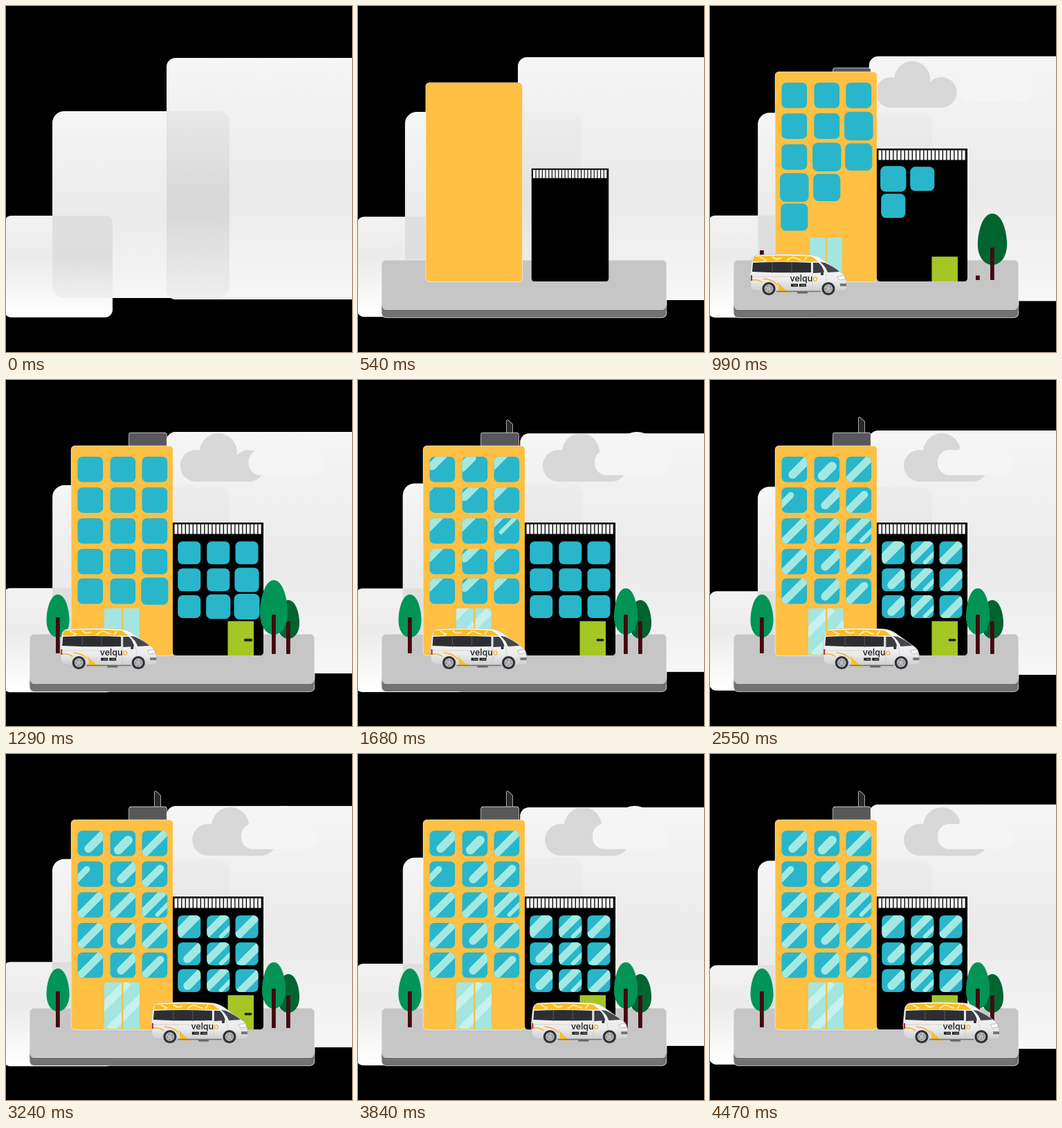
Write an HTML page that moves like this. It is 500 by 500 pixels and loops after 4500 ms.

```html
<!DOCTYPE html>
<html lang="en">
<head>
<meta charset="utf-8">
<title>City street</title>
<style>
  html, body { margin: 0; width: 100%; height: 100%; overflow: hidden; background: #000; }
  svg { display: block; width: 100%; height: 100%; }
  .cards { isolation: isolate; }
  .cards .tint { mix-blend-mode: multiply; }
  .rim { stroke: #efefef; stroke-width: 1.4; paint-order: stroke; }
  .brand { font: 500 12.5px Inter, sans-serif; }
</style>
</head>
<body>
<svg viewBox="0 0 500 500">
  <defs>
    <linearGradient id="haze" x1="0" y1="0" x2="0" y2="1">
      <stop offset="0" stop-color="#f6f6f6"/>
      <stop offset=".55" stop-color="#eaeaea"/>
      <stop offset="1" stop-color="#f7f7f7"/>
    </linearGradient>
    <linearGradient id="fade" x1="0" y1="0" x2="0" y2="1">
      <stop offset="0" stop-color="#f3f3f3"/>
      <stop offset=".4" stop-color="#ebebeb"/>
      <stop offset="1" stop-color="#fff"/>
    </linearGradient>
    <linearGradient id="paint" x1="0" y1="0" x2="0" y2="1">
      <stop offset="0" stop-color="#fafafa"/>
      <stop offset=".7" stop-color="#ececec"/>
      <stop offset="1" stop-color="#cfcfcf"/>
    </linearGradient>
    <clipPath id="glass"><path d="M142 333q0-3 3-3h22v67h-25zM169.500 330h20.500q3 0 3 3v64h-23.500z"/></clipPath>
  </defs>

  <g class="cards">
    <rect class="tint" id="card3" x="-3" y="303" width="157" height="147" rx="11" fill="url(#fade)"/>
    <rect class="tint" id="card2" x="67" y="152" width="256" height="270" rx="17" fill="url(#haze)"/>
    <rect class="tint" id="card1" x="232" y="75" width="352" height="349" rx="13" fill="url(#haze)"/>
    <rect id="wash" x="232" y="75" width="352" height="349" rx="13" fill="url(#haze)"/>
  </g>

  <g id="greyCloud" fill="#d8d8d8">
    <circle cx="303" cy="124" r="23"/>
    <circle cx="335" cy="104" r="27"/>
    <circle cx="379" cy="124" r="23"/>
    <rect x="303" y="108" width="76" height="39"/>
  </g>
  <g id="whiteCloud" fill="#f5f5f5">
    <circle cx="390" cy="105" r="30"/>
    <rect x="329" y="101" width="110" height="36.500" rx="17"/>
  </g>

  <g id="base">
    <rect class="rim" x="34.500" y="378" width="411" height="72" rx="6" fill="#727272"/>
    <rect class="rim" x="34.500" y="367.500" width="411" height="71" rx="6" fill="#c6c6c6"/>
    <path d="M34.500 430v9q0 6 6 6h399q6 0 6-6v-9q0 9-6 9h-399q-6 0-6-9z" fill="#727272"/>
  </g>

  <path class="rim" id="mast" d="M215 77V54.500l1.500-.5 6.500 6v17z" fill="#29292b"/>
  <rect class="rim" id="roof" x="178" y="76.500" width="54" height="28" rx="3" fill="#57585a"/>
  <rect class="rim" id="tower" x="94.500" y="95.500" width="146.500" height="302.500" rx="5" fill="#ffc043"/>
  <g id="block">
    <path d="M241 206h131v187q0 5-5 5H246q-5 0-5-5z"/>
    <path d="M243.500 215.500H370" stroke="#f4f4f4" stroke-width="14" stroke-dasharray="4.200 1.300"/>
  </g>
  <g id="windows"></g>

  <g id="glassDoor" clip-path="url(#glass)">
    <rect x="141" y="329" width="53" height="69" fill="#a3e6e0"/>
    <g id="doorShine" stroke="#c6f1ed" stroke-width="12">
      <path d="M134 372l42-42M150 398l52-52"/>
    </g>
  </g>
  <rect id="greenDoor" x="320.500" y="348.500" width="37.500" height="49.500" fill="#a6c626"/>
  <rect id="handle" x="344.500" y="374" width="11" height="3.500" rx="1.700" fill="#1c2410"/>

  <g id="trees"></g>

  <g id="van"><g transform="translate(278 358)">
    <path d="M69 54h15v3.500H69z" fill="#666"/>
    <path d="M3 12Q4 3 11 2Q55-.5 90 2Q99 3 106 8L131 26Q139 30 140 40L141 50Q140 54 133 54H16Q3 54 2 48L1 33z"
      fill="url(#paint)" stroke="#b9b9b9" stroke-width=".7"/>
    <path d="M7 4Q50 1 90 4L100 11.500H4z" fill="#f9bd22"/>
    <path d="M15 5l9 4-6 3M33 4q6 6 13 2M54 10q7-7 12-4t9 3M83 5l-4 5" fill="none" stroke="#fff0b8" stroke-width="1.800"/>
    <path d="M5 13Q45 11 89 13V27Q40 28 4 26z" fill="#2d2e32"/>
    <path d="M33 12v16M61 12v16" stroke="#54565a" stroke-width="1"/>
    <path d="M92 13h8q6 5 8 14l-16 1z" fill="#3a3c41"/>
    <path d="M102 12l7 1q13 6 21 13l-17 1q-3-9-11-15z" fill="#45474d"/>
    <path d="M91 12v42M110 28l2 12M4 33h86" stroke="#c8c8c8" stroke-width=".7" fill="none"/>
    <path d="M36 33q7 14 23 24l-17-3q2-11-6-21z" fill="#f9bd22"/>
    <path d="M3 38q11-1 16 4M20 36q14 1 20 9" fill="none" stroke="#f6b52a" stroke-width="1.500"/>
    <path d="M2 31h2v8H2z" fill="#b4272d"/>
    <path d="M127 33l10-2 2 6-9 1z" fill="#f8f8f8" stroke="#999" stroke-width=".6"/>
    <path d="M131 43h9v4h-9z" fill="#777"/>
    <rect x="103" y="27" width="4" height="4" rx="1" fill="#333"/>
    <path d="M39 54.500h64" stroke="#707070" stroke-width="1.500"/>
    <text class="brand" x="58.500" y="39.500" fill="#17181c">velqu<tspan fill="#f3b52b">o</tspan></text>
    <path d="M60 43.500h10v4H60zM72 43.500h10v4H72z" fill="#17181c"/>
    <path d="M63 45.500h6M75 45.500h6" stroke="#aaa" stroke-width=".8"/>
    <g id="wheels"></g>
  </g></g>
</svg>

<script>
const LOOP = 4500, STEP = 30, SWAY = 1920;
const $ = id => document.getElementById(id);
const clamp = u => Math.min(1, Math.max(0, u));
const span = (t, a, b) => clamp((t - a) / (b - a));
const easeOut = u => 1 - (1 - u) ** 2;
const easeInOut = u => u * u * (3 - 2 * u);
const wave = (t, peak) => Math.cos(2 * Math.PI * (t - peak) / SWAY);
const tracks = [];

function add(parent, name, attrs) {
  const el = document.createElementNS('http://www.w3.org/2000/svg', name);
  for (const k in attrs) el.setAttribute(k, attrs[k]);
  return parent.appendChild(el);
}

function keys(t, points) {
  if (t <= points[0][0]) return points[0][1];
  for (let i = 1; i < points.length; i++) {
    const [a, va] = points[i - 1], [b, vb] = points[i];
    if (t < b) return va + (vb - va) * (t - a) / (b - a);
  }
  return points[points.length - 1][1];
}

const pop = (t, start, peak = 1.13) =>
  keys(t - start, [[0, 0], [85, 1 + (peak - 1) / 2], [140, peak], [175, peak], [260, 1]]);

// Each track maps time to { x, y, sx, sy, o }, scaled around (ox, oy).
function track(el, ox, oy, pose) {
  tracks.push(t => {
    const { x = 0, y = 0, sx = 1, sy = sx, o = 1 } = pose(t);
    el.setAttribute('transform',
      `translate(${ox + x} ${oy + y}) scale(${sx} ${sy}) translate(${-ox} ${-oy})`);
    el.setAttribute('opacity', o);
    el.setAttribute('visibility', sx * sy * o ? 'visible' : 'hidden');
  });
}

const grow = (el, ox, oy, a, b) => track(el, ox, oy, t => ({ sx: easeOut(span(t, a, b)) }));
const rise = (el, oy, a, b) => track(el, 0, oy, t => ({ sy: easeOut(span(t, a, b)) }));

// Background cards breathe; the wash lightens their overlap
const breathe = (id, ox, oy, amp, peak, opacity = () => 1) =>
  track($(id), ox, oy, t => ({ sx: 1 + amp * span(t, 0, 900) * wave(t, peak), o: opacity(t) }));
breathe('card1', 408, 249.5, -.0143, 1782);
breathe('wash', 408, 249.5, -.0143, 1782, t => .6 * span(t, 0, 300));
breathe('card2', 195, 287, .0195, 1782);
breathe('card3', 75.5, 400, .027, 1436);

// Clouds drift in, then sway against each other
function cloud(id, ox, dir, enter, arrive) {
  track($(id), ox, 147, t => ({
    x: t < 1590
      ? keys(t, [[700, enter], [990, arrive], [1590, dir * 13.4]])
      : dir * 6.7 * (1 + wave(t, 1590)),
    sx: keys(t, [[700, .8], [990, .96], [1200, 1]]),
    o: span(t, 700, 990)
  }));
}
cloud('greyCloud', 341, -1, -56, -43);
cloud('whiteCloud', 384, 1, 36, 30);

grow($('base'), 240, 409, 0, 350);
grow($('tower'), 167.5, 398, 200, 640);
grow($('block'), 306.5, 398, 270, 710);
track($('roof'), 0, 0, t => ({ y: 20 * (1 - easeOut(span(t, 935, 1240))), o: +(t > 930) }));
track($('mast'), 0, 0, t => ({ y: 24 * (1 - span(t, 1500, 1716)), o: +(t > 1500) }));
grow($('glassDoor'), 167.5, 397, 800, 1060);
rise($('greenDoor'), 398, 900, 1090);
track($('handle'), 350, 376, t => ({ sx: pop(t, 1120) }));

const slide = (t, start) => -26 * (1 - easeInOut(span(t, start, start + 270)));
track($('doorShine'), 0, 0, t => ({ x: slide(t, 1540), y: slide(t, 1540), o: +(t > 1540) }));

// Diagonal bands per pane: [low end, high end, shift to lower right, width]
const shine = {
  F: [[-30, 30, 0, 11]],
  W: [[-30, 30, -3, 14]],
  G: [[-30, 30, 3, 11]],
  L: [[-5, 30, 2.5, 12]],
  U: [[-30, 8, 0, 11]],
  B: [[-8, 6, 1.5, 13]],
  E: [[-30, 1, -6, 9]],
  D: [[-30, 30, -3, 11], [-5, 30, 9, 6]]
};

function windowGrid(xs, ys, size, kinds, start, shineStart) {
  ys.forEach((y, r) => xs.forEach((x, c) => {
    const id = `w${size}-${r}-${c}`, cx = x + size / 2, cy = y + size / 2;
    const box = { x, y, width: size, height: size, rx: 7 };
    const g = add($('windows'), 'g', {});
    add(add(g, 'clipPath', { id }), 'rect', box);
    add(g, 'rect', { ...box, fill: '#29b6ca' });
    const bands = add(add(g, 'g', { 'clip-path': `url(#${id})` }), 'g', {
      stroke: '#a3e8e2', 'stroke-linecap': 'round'
    });
    for (const [a, b, d, w] of shine[kinds[r * xs.length + c]])
      add(bands, 'path', {
        d: `M${cx + d + a} ${cy + d - a}L${cx + d + b} ${cy + d - b}`, 'stroke-width': w
      });
    track(g, cx, cy, t => ({ sx: pop(t, start + 85 * (r + c)) }));
    track(bands, 0, 0, t => ({
      x: slide(t, shineStart), y: slide(t, shineStart), o: +(t > shineStart)
    }));
  }));
}
windowGrid([103.5, 150.5, 196.5], [110.8, 155.2, 199.8, 244, 286.8], 36.7, 'LBFELUFFDFLFFLU', 565, 1540);
windowGrid([248.3, 290.3, 331.5], [233.3, 272.3, 311], 33, 'WDFLDGLDG', 820, 1700);

function tree(cx, top, bottom, w, color, trunk, ground, start, peak) {
  const h = bottom - top, r = w / 2;
  const leaf = add($('trees'), 'path', {
    fill: color,
    d: `M${cx} ${top}c${.34 * w} 0 ${r} ${.36 * h} ${r} ${.6 * h}S${cx + .28 * w} ${bottom} ${cx} ${bottom}` +
       `S${cx - r} ${top + .84 * h} ${cx - r} ${top + .6 * h}S${cx - .34 * w} ${top} ${cx} ${top}z`
  });
  const stem = add($('trees'), 'rect', {
    x: cx - 3, y: trunk, width: 5.8, height: ground - trunk, rx: 1, fill: '#430a10'
  });
  rise(stem, ground, start, start + 170);
  track(leaf, cx, bottom, t => ({ sx: pop(t, start + 100, peak) }));
}
tree(75, 310, 372, 33, '#009457', 343, 395, 895, 1.3);
tree(408, 318, 374, 32, '#00642f', 349, 396, 735, 1.32);
tree(387, 301, 368, 34, '#009457', 339, 396, 980, 1.3);

// Van
for (const cx of [28, 114]) {
  const wheel = { cx, cy: 50.5 };
  add($('wheels'), 'circle', { ...wheel, r: 9.6, fill: '#303134' });
  add($('wheels'), 'circle', { ...wheel, r: 6.4, fill: '#b8b9bc' });
  add($('wheels'), 'circle', {
    ...wheel, r: 4, fill: 'none', stroke: '#8b8c8f', 'stroke-width': 2, 'stroke-dasharray': '2.6 2.5'
  });
}
track($('van'), 278, 420, t => ({
  x: Math.min(0, -221 + .0675 * (t - 990)),
  o: span(t, 760, 900)
}));

const begin = performance.now();
function frame() {
  const now = Math.max(0, performance.now() - begin) % LOOP;
  const t = Math.floor(now / STEP) * STEP;
  tracks.forEach(f => f(t));
  requestAnimationFrame(frame);
}
frame();
</script>
</body>
</html>
```
